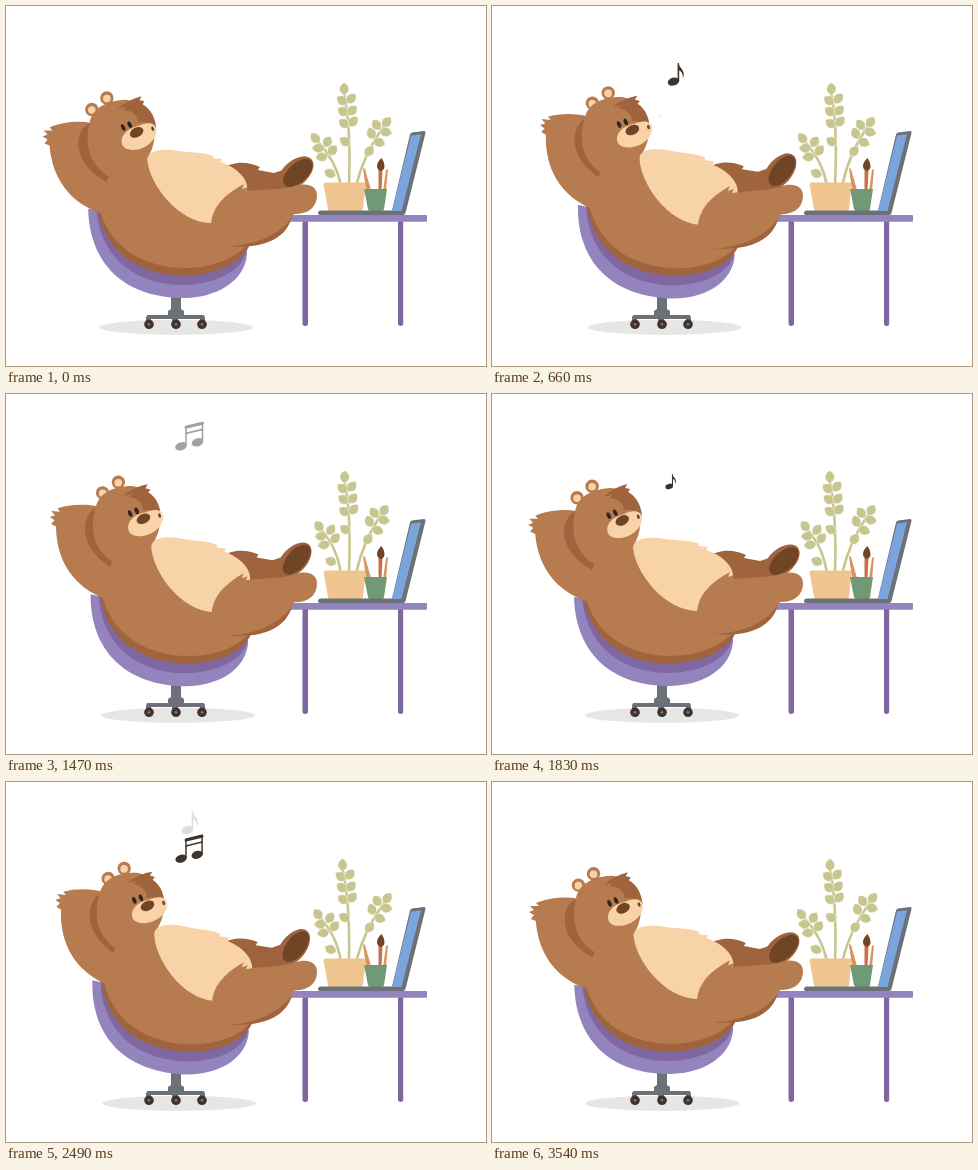
Animation of 480 by 360 pixels, one loop 3570 ms. Source, as an HTML page:

```html
<!DOCTYPE html>
<html lang="en">
<head>
<meta charset="utf-8">
<title>Bear taking a break</title>
<style>
  html, body { margin: 0; width: 100%; height: 100%; overflow: hidden; background: #fff; }
  svg { display: block; width: 480px; height: 360px; }
  .fur { fill: #b77b50; }
  .shade { fill: #9f643d; }
  .cream { fill: #f9d3a8; }
  .dark { fill: #6f4526; }
  .ink { fill: #3f332c; }
  .lilac { fill: #9384bd; }
  .purple { fill: #7f67a2; }
  .grey { fill: #6c7178; }
  .leaf { fill: #c8c68f; }
  .line { fill: none; stroke-linecap: round; stroke-linejoin: round; }
</style>
</head>
<body>
<svg viewBox="0 0 480 360">
  <ellipse id="shadow" cx="170" cy="321.300" rx="77" ry="7.500" fill="#e6e6e6"/>

  <g id="chairBase">
    <path class="grey" d="M165 286h10v17l3 2v4h19q2 0 2 4v4h-5v-4h-22v4h-6v-4h-21v4h-5v-4q0-4 2-4h20v-4l3-2z"/>
    <g class="ink">
      <circle cx="143" cy="318.300" r="4.800"/><circle cx="170" cy="318.300" r="4.800"/><circle cx="196" cy="318.300" r="4.800"/>
    </g>
    <g fill="#8c7770">
      <circle cx="143" cy="318.300" r="1.300"/><circle cx="170" cy="318.300" r="1.300"/><circle cx="196" cy="318.300" r="1.300"/>
    </g>
  </g>

  <g id="desk">
    <path class="purple" d="M296.500 214h5.500v104q0 2-2.700 2t-2.800-2zM392 214h5.200v104q0 2-2.600 2t-2.600-2z"/>
    <rect class="lilac" x="270" y="209" width="151" height="6.800" rx="1"/>
    <g id="plant"></g>
    <path d="M317.500 178.500q0-2 2-2h38q2 0 2 2l-2.500 24.500q0 2-2 2h-31q-2 0-2-2z" fill="#f0c690"/>
    <path d="M357 162l2 1 6 21h-5zM382 163l-2 1-3 21h3z" fill="#d9935f"/>
    <path d="M372.500 164h4l-1 21h-3z" fill="#c6714c"/>
    <path class="dark" d="M375.500 152q3 4 3 8t-3.500 5q-4-1-4-5t4.500-8z"/>
    <path d="M358 183h23l-3 20q0 2-2 2h-12q-2 0-2-2z" fill="#6f9a75"/>
    <path class="grey" d="M312 207q0-2.500 3-2.500h71l18-76q.500-1.500 2-2l12-1.500q2 0 1.500 2l-20 80q-.500 2-2.500 2h-82q-3 0-3-2z"/>
    <path d="M405 129.500l10-1.300-19.500 76.800h-9.500z" fill="#7ba4dc"/>
  </g>

  <g id="seat">
    <path class="lilac" d="M82 203C83 252 112 292 178 292C219 291 242 268 241 244L150 215Z"/>
    <path class="purple" d="M90 203C93 244 121 279 178 279C210 278 237 264 240 245L150 215Z"/>
  </g>

  <g id="farLeg">
    <path class="shade" d="M215 164C227 154 243 156 254 161L252 164L268 167L290 160L283 186C260 192 230 190 215 182Z"/>
    <g id="farFoot">
      <ellipse class="shade" cx="289.500" cy="167.500" rx="21.500" ry="12.500" transform="rotate(-41 289.500 167.500)"/>
      <ellipse class="dark" cx="292" cy="167" rx="18" ry="9.500" transform="rotate(-42 292 167)"/>
    </g>
  </g>

  <g id="torso">
    <path class="shade" d="M91 198C94 238 125 269.500 177 269.500C215 269 237 254 244 238L230 190L146 153L95 170Z"/>
    <path class="fur" d="M91 192C97 234 129 262 180 262C214 261 234 248 243 236L228 190L146 153L95 165Z"/>
    <g id="arm">
      <path class="fur" d="M84 117C71 115 54 117 43 122L46 125L37 125L41 129L36 131L41 134L38 138L43 140C46 175 66 199 97 208L118 200L112 150Z"/>
      <path class="shade" d="M84 117C67 124 64 157 100 176L112 150Z"/>
    </g>
    <g id="head">
      <g id="ears">
        <g class="fur"><circle cx="84.500" cy="104" r="6.700"/><circle cx="99.500" cy="92.500" r="6.700"/></g>
        <g class="cream"><circle cx="84.500" cy="104.500" r="3.800"/><circle cx="99.500" cy="93" r="3.800"/></g>
      </g>
      <path class="fur" d="M83 118C85 102 101 95 118 94C134 95 147 109 148 122C149 138 145 144 141 154L130 190L105 172C86 162 77 142 83 118Z"/>
      <path id="brow" class="shade" d="M111 103Q122 93 135 90L133 94L138 95L136 98C145 103 149 112 150 122C146 117 140 115 132 116C131 108 124 104 117 104L120 101Z"/>
      <g id="face">
        <path class="cream" d="M115 137C114 128 123 122 132 120C138 117 148 115 149.500 123C151 133 140 143 128 144C120 144.500 116 142 115 137Z"/>
        <ellipse class="dark" cx="130" cy="126.500" rx="7.200" ry="4.800" transform="rotate(-28 130 126.500)"/>
        <ellipse class="dark" cx="146" cy="122.800" rx="1.400" ry="2.300" transform="rotate(-20 146 122.800)"/>
        <g fill="#30241f">
          <ellipse cx="116.500" cy="121.700" rx="1.900" ry="3.500" transform="rotate(-25 116.500 121.700)"/>
          <ellipse cx="123" cy="118.800" rx="1.900" ry="3.500" transform="rotate(-25 123 118.800)"/>
        </g>
      </g>
    </g>
    <path class="cream" d="M141 154C141 144 157 142 173 145C188 147 199 146 207 150L206 152L216 153L214 156C230 161 241 172 241 182C238 202 222 215 206 217C172 217 143 178 141 154Z"/>
  </g>

  <g id="nearLeg">
    <path class="shade" d="M221 240C254 243 279 235 286 211L262 205Z"/>
    <path class="fur" d="M205 218C206 202 217 189 238 178L236 183L242 181L240 185C258 183 277 184 289 180C301 176 311 180 311 189C311 201 303 208 288 208C277 227 252 239 222 240Z"/>
  </g>

  <g id="notes"></g>
</svg>
<script>
const LOOP = 3570, TAU = Math.PI * 2;
const $ = id => document.getElementById(id);
const setTransform = (id, value) => $(id).setAttribute('transform', value);
const turn = (id, angle, x, y) => setTransform(id, `rotate(${angle} ${x} ${y})`);
const shift = (id, x, y) => setTransform(id, `translate(${x} ${y})`);
const wave = (t, peak, period) => Math.cos(TAU * (t - peak) / period);
const easeOut = u => Math.sin(Math.min(1, u) * Math.PI / 2);

// Leaves are [x, y, angle] at the point where they join the stem.
const branches = [
  { stem: 'M343 180Q345 120 338 88', height: 100, sway: 1.5, peak: 850,
    leaves: [[338, 89, 0], [341, 98, -55], [341, 97, 42], [342, 109, -55], [342, 109, 42],
             [343, 121, -55], [343, 120, 42], [344, 139, -55]] },
  { stem: 'M335 180Q331 155 314 136', height: 47, sway: 2, peak: 1785,
    leaves: [[315, 137, -38], [320, 141, 32], [320, 142, -92], [324, 149, 40], [323, 150, -98], [330, 170, -65]] },
  { stem: 'M350 180Q358 146 378 119', height: 63, sway: 2, peak: 2910,
    leaves: [[376, 121, 38], [373, 124, -32], [373, 125, 100], [367, 133, -22], [367, 134, 112], [359, 150, 38]] }
];
$('plant').innerHTML = branches.map((b, i) => `<g id="branch${i}">
  <path class="line" stroke="#c8c68f" stroke-width="2.600" d="${b.stem}"/>
  ${b.leaves.map(([x, y, a]) => `<path class="leaf" stroke="#fff" stroke-width=".4"
    transform="translate(${x} ${y}) rotate(${a})" d="M0 0C-6.500 -3 -6 -9 0 -12.500C6 -9 6.500 -3 0 0"/>`).join('')}</g>`).join('');

const noteHead = (x, y) => `<ellipse class="ink" cx="${x}" cy="${y}" rx="6" ry="4" transform="rotate(-18 ${x} ${y})"/>`;
const ink = (d, width) => `<path class="line" stroke="#3f332c" stroke-width="${width}" d="${d}"/>`;
const single = noteHead(-2, 0) + ink('M3 -1V-18', 1.6) +
  '<path class="ink" d="M2.500 -19.500C4 -13 11 -12 7.500 -3C8 -9 5 -11 2.500 -12Z"/>';
const pair = noteHead(-8.5, 0) + noteHead(8, -4) + ink('M-3.500 -1V-20L13 -24V-5', 1.5) +
  ink('M-3.500 -19L13 -23', 3) + ink('M-3.500 -13L13 -17', 1.6);
const notes = [[200, single], [650, pair], [1595, single], [2045, pair], [2535, single]];
$('notes').innerHTML = notes.map(([, shape], i) => `<g id="note${i}">${shape}</g>`).join('');

const leanAt = t => (1 - wave(t, 105, LOOP / 2)) / 2;

function draw(t) {
  const lean = leanAt(t), nod = leanAt(t - 60); // the head follows the body slightly late
  shift('shadow', 4.2 * lean, 0);
  turn('seat', 4.2 * lean, 170, 280);
  turn('torso', 4.9 * lean, 176, 264);
  turn('arm', 5 * lean, 110, 190);
  turn('head', 2 * nod, 117, 165);
  shift('ears', 8.3 * nod, -2.6 * nod);
  shift('brow', -2.4 * nod, 2.5 * nod);
  setTransform('face', `translate(${2.6 * nod} ${-0.8 * nod}) rotate(${-3 * nod} 131 131)`);
  turn('farLeg', -2.4 * lean, 225, 235);
  turn('farFoot', -11 * lean, 290, 167);
  turn('nearLeg', -2.5 * lean, 305, 190);

  branches.forEach(({ height, sway, peak }, i) => {
    const k = -sway * wave(t, peak, LOOP) / height;
    setTransform('branch' + i, `matrix(1 0 ${k} 1 ${-178 * k} 0)`);
  });

  notes.forEach(([start], i) => {
    const age = t - start;
    const visible = age > 0 && age < 935;
    $('note' + i).setAttribute('opacity', visible ? Math.min(1, (935 - age) / 250) : 0);
    if (!visible) return;
    const x = 167 + 16.5 * easeOut(age / 480), y = 112 - 0.087 * age + 1.75e-5 * age * age;
    setTransform('note' + i, `translate(${x} ${y}) scale(${easeOut(age / 520)})`);
  });
}

const begin = performance.now();
function tick() {
  draw((performance.now() - begin) % LOOP);
  requestAnimationFrame(tick);
}
tick();
</script>
</body>
</html>
```
